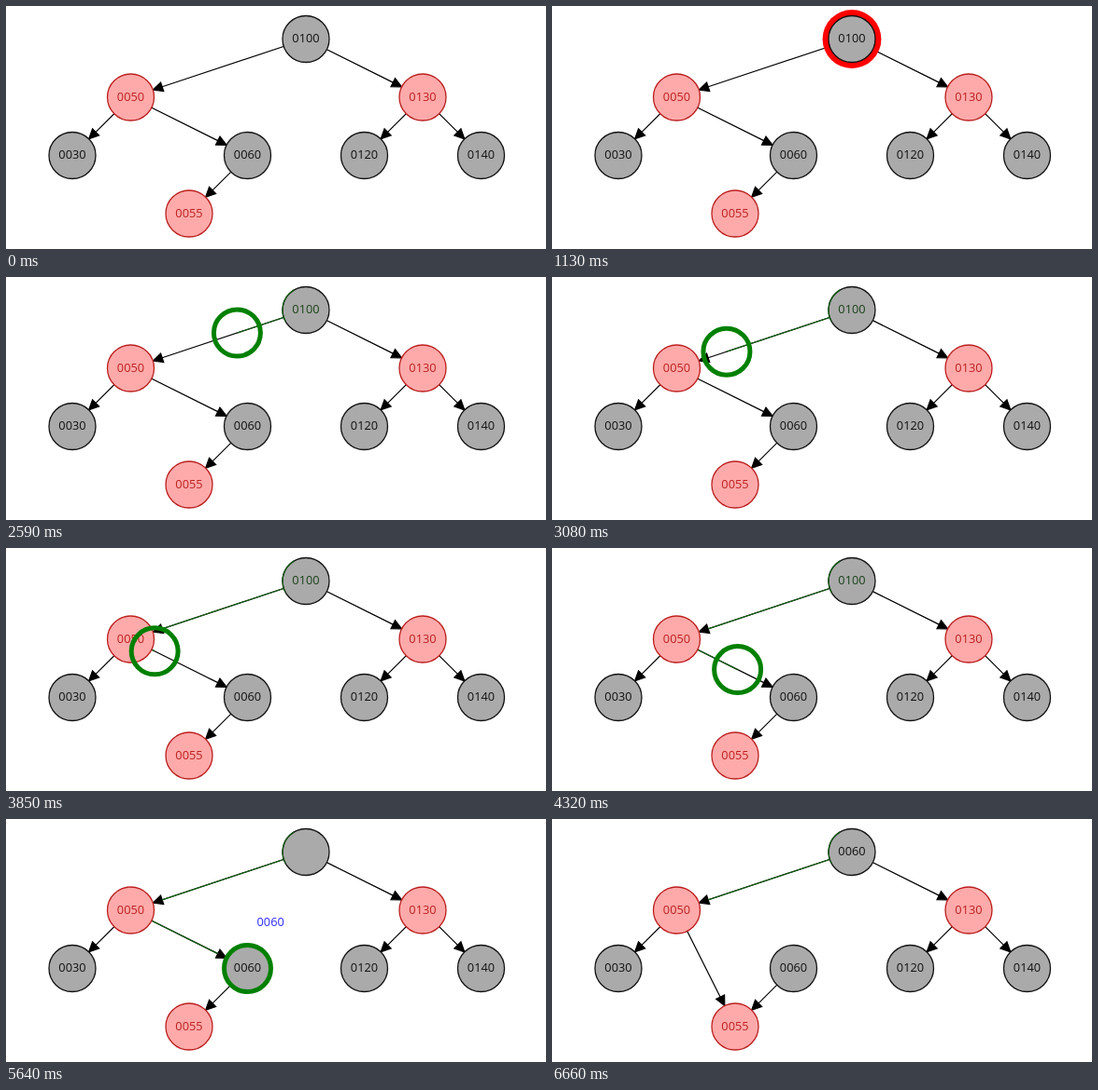
Animation, 578 px wide and 261 px high, one loop 8000 ms. Source, as an HTML page:

```html
<!DOCTYPE html>
<html lang="en">
<head>
<meta charset="utf-8">
<title>Tree deletion</title>
<style>
  html, body { margin: 0; width: 100%; height: 100%; overflow: hidden; background: #fff; }
  svg { display: block; width: 578px; height: 261px; }
  text { font: 12.8px "Open Sans", "Noto Sans", sans-serif; text-anchor: middle; }
</style>
</head>
<body>
<svg id="stage" viewBox="0 0 578 261"></svg>
<script>
const LOOP = 8000, R = 25, ARROW = 10.5;
const BLACK = '#111', RED = '#bb1e1e', GREEN = '#008000', TRAIL = '#145c14';
const stage = document.getElementById('stage');

function add(tag, attrs, text) {
  const el = document.createElementNS('http://www.w3.org/2000/svg', tag);
  set(el, attrs);
  if (text) el.textContent = text;
  stage.append(el);
  return el;
}
function set(el, attrs) {
  for (const name in attrs) el.setAttribute(name, attrs[name]);
}
const show = (el, on) => set(el, { visibility: on ? 'visible' : 'hidden' });

// Tree nodes: centre, value, red flag
const node = (x, y, value, red) => ({ x, y, value, red });
const root = node(321, 35.5, '0100');
const left = node(133.5, 98, '0050', true);
const right = node(446, 98, '0130', true);
const n30 = node(71, 160.5, '0030');
const n60 = node(258.5, 160.5, '0060');
const n120 = node(383.5, 160.5, '0120');
const n140 = node(508.5, 160.5, '0140');
const n55 = node(196, 223, '0055', true);

const mix = (a, b, f) => ({ x: a.x + (b.x - a.x) * f, y: a.y + (b.y - a.y) * f });

function edge(a, b) {
  const len = Math.hypot(b.x - a.x, b.y - a.y);
  const ux = (b.x - a.x) / len, uy = (b.y - a.y) / len;
  const tx = b.x - ux * R, ty = b.y - uy * R;
  const bx = tx - ux * ARROW, by = ty - uy * ARROW, w = 5;
  return add('path', {
    d: `M${a.x} ${a.y}L${bx} ${by}M${tx} ${ty}L${bx - uy * w} ${by + ux * w}L${bx + uy * w} ${by - ux * w}Z`,
    fill: '#000', stroke: '#000', 'stroke-width': 1.2
  });
}

function drawNode(n) {
  const ink = n.red ? RED : BLACK;
  add('circle', { cx: n.x, cy: n.y, r: R, fill: n.red ? '#ffaaaa' : '#aaaaaa', stroke: ink, 'stroke-width': 1.3 });
  return add('text', { x: n.x, y: n.y + 3.8, fill: ink }, n.value);
}

const trailLine = () => add('line', { stroke: TRAIL, 'stroke-width': 1.3 });

function drawTrail(line, a, b, f) {
  const len = Math.hypot(b.x - a.x, b.y - a.y);
  const end = mix(a, b, Math.min(f, 1 - (R + ARROW) / len));
  set(line, { x1: a.x, y1: a.y, x2: end.x, y2: end.y });
}

[[root, left], [root, right], [left, n30], [n60, n55], [right, n120], [right, n140]].forEach(p => edge(...p));
const oldEdge = edge(left, n60);
const newEdge = edge(left, n55);
const trail1 = trailLine(), trail2 = trailLine();
const halo = add('circle', { cx: root.x, cy: root.y, fill: '#ff0000' });
const rootText = drawNode(root);
[left, right, n30, n60, n120, n140, n55].forEach(drawNode);
const rim = add('path', {
  d: `M${root.x - 12.5} ${root.y - 21.65}A${R} ${R} 0 0 0 ${root.x - 21.65} ${root.y + 12.5}`,
  fill: 'none', stroke: TRAIL, 'stroke-width': 1.3
});
const ring = add('circle', { r: R, fill: 'none', stroke: GREEN, 'stroke-width': 5 });
const label = add('text', { fill: '#2a2aff' }, '0060');

// Each run holds 11 evenly spaced steps between its two times
const runs = [
  [510, 1280], [1370, 2130], [2200, 2980], [3080, 3850],
  [3930, 4720], [4790, 5560], [5640, 6420], [6500, 7300]
];
const HALO_END = 20, LABEL_START = 59, DONE = 79;

function stepAt(t) {
  let step = -1;
  runs.forEach(([from, to], i) => {
    if (t >= from) step = i * 11 + Math.min(10, Math.floor((t - from) / (to - from) * 10 + 0.1));
  });
  return step;
}

const part = (step, start, length) => Math.max(0, Math.min(1, (step - start) / length));

function render(t) {
  const k = stepAt(t);
  const down = part(k, 19.7, 18.6);
  const across = part(k, 39.1, 19);
  const lift = part(k, 58.5, 19);
  const done = k >= DONE;

  show(halo, k >= 0 && k < HALO_END);
  set(halo, { r: 28.75 + Math.abs(5 - Math.abs(k - 13) * 0.464) });

  const at = across > 0 ? mix(left, n60, across) : mix(root, left, down);
  set(ring, { cx: at.x, cy: at.y });
  show(ring, k >= HALO_END && !done);

  drawTrail(trail1, root, left, down);
  drawTrail(trail2, left, n60, across);
  show(trail1, down > 0);
  show(trail2, across > 0 && !done);
  show(rim, down > 0.2);

  const pos = mix(n60, root, lift);
  set(label, { x: pos.x, y: pos.y + 3.8 });
  show(label, k >= LABEL_START && !done);

  rootText.textContent = done ? '0060' : k >= LABEL_START ? '' : '0100';
  set(rootText, { fill: down > 0.2 && !done ? '#1a421a' : BLACK });
  show(oldEdge, !done);
  show(newEdge, done);
}

const begin = performance.now();
function tick() {
  render((performance.now() - begin) % LOOP);
  requestAnimationFrame(tick);
}
tick();
</script>
</body>
</html>
```
